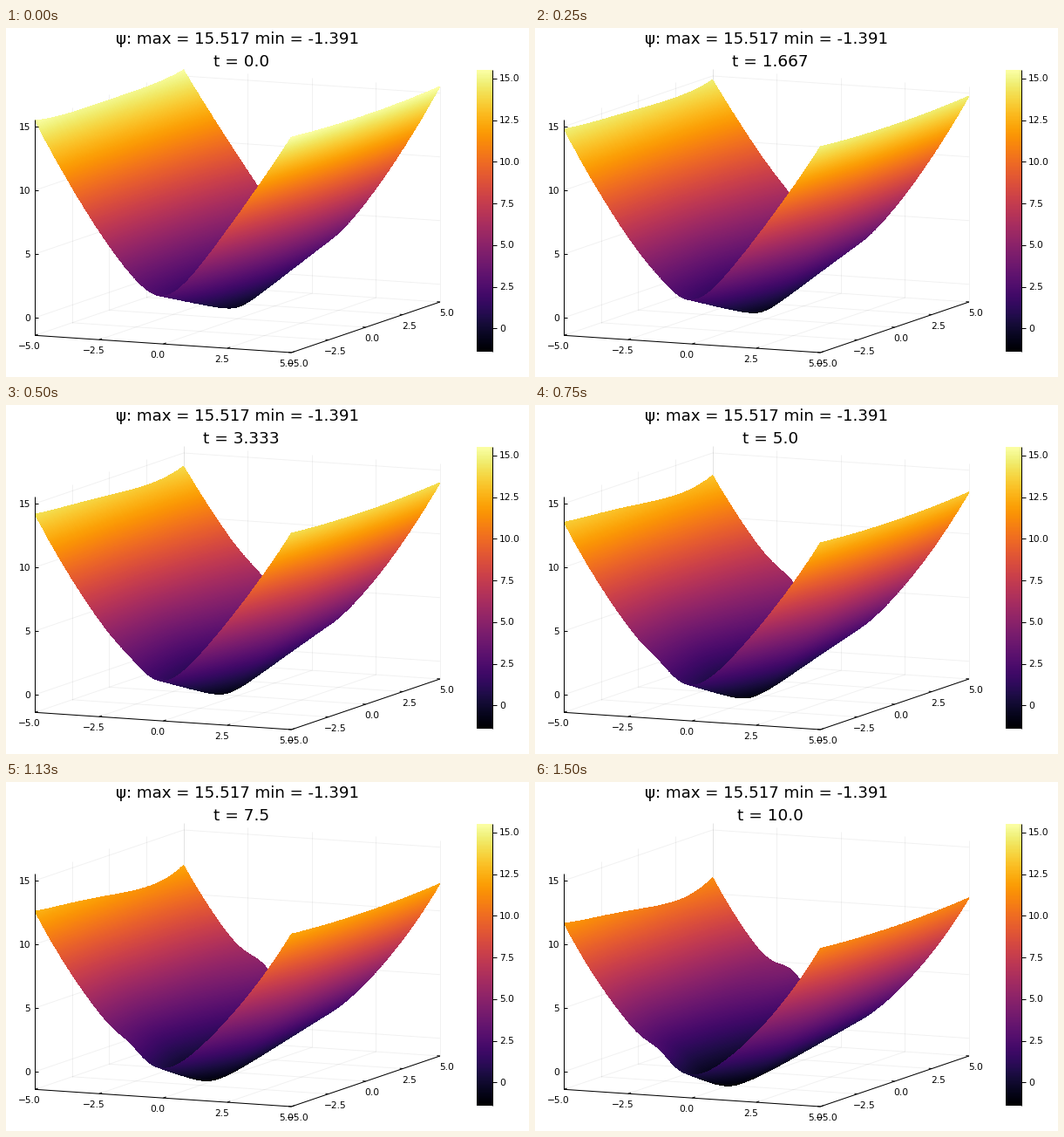
Recreate the animation shown at these times as a matplotlib script. Size 600 by 400 pixels, loop 1620 ms.

```python
import numpy as np
import matplotlib.pyplot as plt
from matplotlib.animation import FuncAnimation

W, H, DPI = 600, 400, 100
STEPS, TICK_MS, LOOP_MS = 13, 10, 1620
Z_MIN, Z_MAX = -1.391, 15.517
PT = 72 / DPI  # points per pixel

plt.rcParams["font.family"] = "DejaVu Sans"
cmap = plt.get_cmap("inferno")
fig = plt.figure(figsize=(W / DPI, H / DPI), dpi=DPI, facecolor="white")
ax = fig.add_axes([0, 0, 1, 1])
ax.axis("off")

# Sample grid; y runs from back to front
X, Y = np.meshgrid(np.linspace(-5, 5, 1100), np.linspace(5, -5, 440))


def project(x, y, z):
    a, b = x + 5, y + 5
    return 33.2 + 29.42 * a + 17.05 * b, 332 + 1.97 * a - 5.8 * b - 14.6 * z


def bump(x0, y0, wide, deep):
    return np.exp(-((X - x0) / wide)**2 / 2 - ((Y - y0) / deep)**2 / 2)


def surface_at(t):
    """An elliptical cone that sinks, rounds off and drifts to the front."""
    s, v = t / 10, Y / 5

    # Height along the valley floor (x = 0)
    d = Y + 2.4 * s
    slope = np.where(d < 0, 0.66 + 0.22 * s, 0.66 - 0.36 * s)
    floor = -0.96 - 1.35 * s + 0.4 * s**2 + np.hypot(slope * d, 0.5)

    # Heights along the two rims (x = -5 and x = 5)
    left = (15.1 - 4.35 * s + (0.38 + 0.34 * s**2) * v**4
            - s * (2 - s) * (v - 0.81 * v**3))
    right = 15.25 - 4.5 * s + 0.27 * v**2
    rim = np.where(X < 0, left, right)

    # Hyperbola across the valley, with some cubic growth mixed in
    radius = np.hypot(0.2 * Y * (1 - 0.5 * s), 0.17 + 0.7 * s)
    rise = (np.hypot(X, radius) - radius) / (np.hypot(5, radius) - radius)
    mix = 0.07 + 0.18 * s
    z = floor + (rim - floor) * ((1 - mix) * rise + mix * abs(X / 5)**3)

    twist = -0.35 * (1 - s) * v * np.sin(np.pi * X / 5)
    bumps = 1.6 * bump(-1.8, 5, 0.6, 2.5) + 0.5 * bump(-1.3, -5, 0.4, 2)
    return z + twist + s * bumps


def render(t):
    """Paint the surface samples back to front into an RGBA image."""
    z = surface_at(t)
    px, py = project(X, Y, z)
    img = np.full((H, W), np.nan)
    img[py.astype(int).ravel(), px.astype(int).ravel()] = z.ravel()
    shade = np.clip((img - Z_MIN) / (Z_MAX - Z_MIN), 0, 1)
    return cmap(np.ma.masked_invalid(shade), bytes=True)


def line(p, q, **kw):
    ax.plot([p[0], q[0]], [p[1], q[1]], color="black", lw=PT,
            solid_capstyle="butt", **kw)


def label(x, y, s, ha="center", size=10.6):
    return ax.text(x, y, s, ha=ha, va="baseline", fontsize=size * PT)


def grid(*points):
    for p, q in zip(points, points[1:]):
        line(project(*p), project(*q), alpha=0.055, zorder=1)


def signed(v):
    return f"{v:.1f}".replace("-", "\u2212")


# Floor, back walls and ticks
for v in np.arange(-5, 5.1, 2.5):
    grid((v, -5, Z_MIN), (v, 5, Z_MIN), (v, 5, Z_MAX))
    grid((5, v, Z_MIN), (-5, v, Z_MIN), (-5, v, Z_MAX))
    x, y = project(v, -5, Z_MIN)
    line((x, y), (x + 3.4, y - 1.2), zorder=4)
    label(x - 6, y + 16, signed(v))
    x, y = project(5, v, Z_MIN)
    line((x, y), (x - 3.5, y - 0.3), zorder=4)
    label(x + 7.3, y + 16, signed(v))
for v in range(0, 16, 5):
    grid((-5, -5, v), (-5, 5, v), (5, 5, v))
    x, y = project(-5, -5, v)
    line((x, y), (x + 3.5, y), zorder=4)
    label(28, y + 3.6, str(v), "right")

# Axes
corners = [project(-5, -5, Z_MAX), project(-5, -5, Z_MIN),
           project(5, -5, Z_MIN), project(5, 5, Z_MIN)]
for p, q in zip(corners, corners[1:]):
    line(p, q, zorder=4)

# Colour bar
TOP, BOTTOM = 48, 371
ax.imshow(np.linspace(1, 0, 256)[:, None], cmap=cmap, aspect="auto",
          extent=(540, 558, BOTTOM, TOP), interpolation="nearest")
line((558.2, TOP), (558.2, BOTTOM))
for v in np.arange(0, 15.1, 2.5):
    y = BOTTOM - (v - Z_MIN) / (Z_MAX - Z_MIN) * (BOTTOM - TOP)
    line((558, y), (563, y))
    label(566, y + 3.4, f"{v:.1f}" if v else "0", "left")

label(265.5, 18.4, f"\u03c8: max = {Z_MAX} min = {Z_MIN}", size=18.25)
clock = label(270, 44.4, "", size=18.5)

times = [10 * k / (STEPS - 1) for k in range(STEPS)]
images = [render(t) for t in times]
surface = ax.imshow(images[0], extent=(0, W, H, 0), aspect="auto",
                    interpolation="nearest", zorder=3)
ax.set_xlim(0, W)
ax.set_ylim(H, 0)

# First tick of each step, 125 ms apart and rounded to whole ticks
starts = [int(12.5 * k + 0.5) for k in range(STEPS)]


def update(i):
    k = int(np.searchsorted(starts, i, side="right")) - 1
    surface.set_data(images[k])
    clock.set_text(f"t = {round(times[k], 3)}")
    return surface, clock


anim = FuncAnimation(fig, update, frames=LOOP_MS // TICK_MS,
                     interval=TICK_MS, repeat=True)
plt.show()
```
